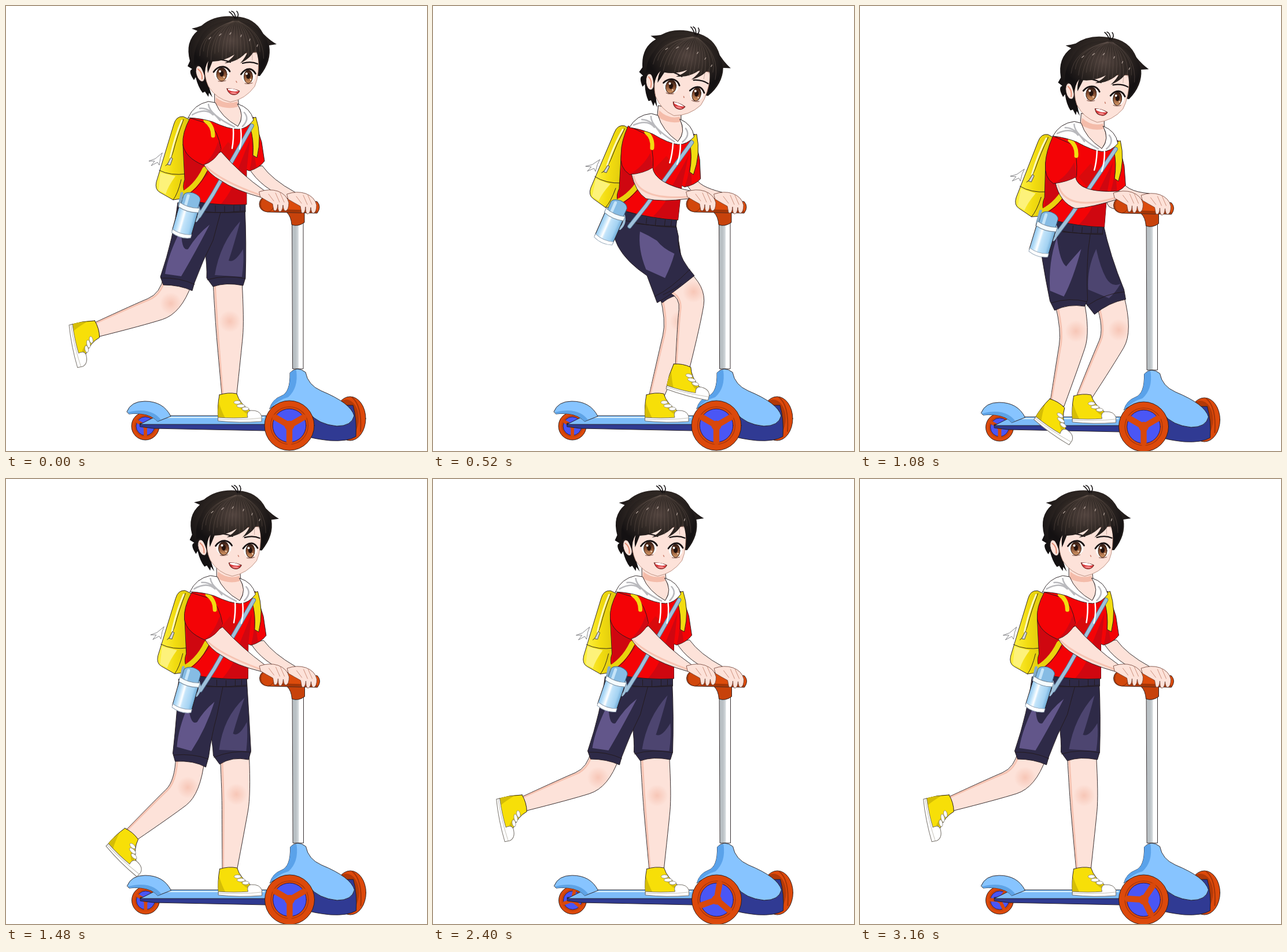
Recreate the animation shown at these times as an HTML page. Size 728 by 769 pixels, loop 3200 ms.

```html
<!DOCTYPE html>
<html lang="en">
<head>
<meta charset="utf-8">
<title>Scooter ride</title>
<style>
html, body { margin: 0; width: 100%; height: 100%; overflow: hidden; background: #fff; }
svg { display: block; width: 728px; height: 769px; }
path, ellipse, circle { stroke-linejoin: round; stroke-linecap: round; }
.ink { stroke: #231a1c; stroke-width: .9; }
.line { fill: none; stroke: #231a1c; stroke-width: .9; }
.skin { fill: #fde2d9; }
.edge { fill: none; stroke: #efa58c; stroke-width: 3; opacity: .5; }
</style>
</head>
<body>
<svg viewBox="0 0 728 769">
<defs>
  <radialGradient id="hairTone" cx=".5" cy=".35" r=".55">
    <stop offset="0" stop-color="#51433e"/><stop offset=".55" stop-color="#302824"/><stop offset="1" stop-color="#141112"/>
  </radialGradient>
  <radialGradient id="blush"><stop offset="0" stop-color="#f0a48c" stop-opacity=".45"/><stop offset="1" stop-color="#f0a48c" stop-opacity="0"/></radialGradient>
  <linearGradient id="iris" x2="0" y2="1"><stop offset="0" stop-color="#2a1711"/><stop offset=".45" stop-color="#7c472c"/><stop offset="1" stop-color="#d79a68"/></linearGradient>
  <linearGradient id="bag" x2="1"><stop offset=".1" stop-color="#fdee3c"/><stop offset=".4" stop-color="#f2dc10"/><stop offset="1" stop-color="#cdb90b"/></linearGradient>
  <linearGradient id="steel"><stop offset=".3" stop-color="#b9c0c4"/><stop offset=".55" stop-color="#d5dadd"/><stop offset=".6" stop-color="#fff"/></linearGradient>
  <linearGradient id="glass"><stop offset="0" stop-color="#8fc6ee"/><stop offset=".2" stop-color="#c6e6fb"/><stop offset=".35" stop-color="#fff"/><stop offset=".45" stop-color="#c3e4fa"/><stop offset=".8" stop-color="#a3d2f2"/><stop offset="1" stop-color="#6eaad6"/></linearGradient>
  <g id="shoe">
    <path class="ink" fill="#f7df08" d="M-16-1Q-1-6 14-3Q19 14 38 27L42 39L-18 41Q-20 20-16-1Z"/>
    <path fill="#d5bd05" d="M-17 12Q-12 28-6 39L-18 40Q-20 26-17 12ZM16 6Q14 20 30 31L40 32Q24 20 16 6Z"/>
    <path d="M-18 38Q10 40 33 38Q30 28 38 26Q54 25 57 36V45Q18 48-18 44Z" fill="#fff" stroke="#77726b"/>
    <path d="M-17 41Q20 43 56 39" fill="none" stroke="#c5c2ba"/>
    <g fill="#fff" stroke="#8b867c" stroke-width=".8"><ellipse cx="15" cy="12" rx="6" ry="3"/><ellipse cx="21" cy="18" rx="7" ry="3"/><ellipse cx="29" cy="23" rx="6" ry="3"/></g>
  </g>
  <path id="hand" class="skin" stroke="#6b3c30" stroke-width=".8" d="M438 321Q455 315 470 320Q486 326 489 340Q489 352 484 354Q480 355 479 344Q478 357 472 355Q470 352 470 343Q469 357 463 353L461 342Q450 336 440 330Z"/>
</defs>
<g id="world">
  <g id="scooter">
    <ellipse cx="595" cy="713" rx="27" ry="38" fill="#dd490b" class="ink"/>
    <ellipse cx="588" cy="713" rx="22" ry="33" fill="#b23908"/>
    <path d="M598 676Q616 690 613 735" fill="none" stroke="#a23408" stroke-width="2"/>
    <g id="rearWheel"></g>
    <path class="ink" fill="#2f3a91" d="M232 721H450V734L255 730L232 727Z"/>
    <path class="ink" fill="#7dbcf8" d="M262 708H450V723H232Z"/>
    <path d="M272 711H446" stroke="#d9efff" stroke-width="2"/>
    <path class="ink" fill="#87c4ff" d="M209 701Q216 683 240 683Q272 683 285 709L262 718Q247 701 213 705Z"/>
    <path fill="#5ea3e6" d="M211 702Q250 692 268 715L262 718Q247 701 213 705Z"/>
    <path class="ink" fill="#303a93" d="M460 690L600 690Q607 715 605 744Q590 753 560 751Q530 748 515 742Z"/>
    <path class="ink" fill="#87c4ff" d="M456 696Q460 680 476 674Q492 668 491 634Q503 621 518 633Q522 655 545 665Q596 686 602 708Q598 726 572 726Q540 723 524 703Q510 685 490 684Q470 685 456 696Z"/>
    <path fill="#5aa2ea" d="M456 696Q460 680 476 674Q492 668 491 634Q498 628 502 630Q506 660 488 676Q472 680 456 696Z"/>
    <path class="ink" fill="url(#steel)" d="M495 374H514V627H496Z"/>
    <g id="frontWheel"></g>
  </g>
  <path id="farArm" class="skin ink"/>
  <g id="farLeg"></g>
  <use href="#shoe" x="385" y="673"/>
  <path id="farShorts" class="ink" fill="#2e2a47"/>
  <path id="farShine" fill="#4d4570"/>
  <g id="nearLeg"></g>
  <use href="#shoe" id="nearShoe"/>
  <path id="nearShorts" class="ink" fill="#2e2a47"/>
  <path id="nearShine" fill="#62568a"/>
  <path id="nearHem" class="line"/>
  <path id="farHem" class="line"/>
  <g id="torso">
    <path class="ink" fill="#2e2a47" d="M300 338L414 340V356Q360 360 298 350Z"/>
    <path class="line" d="M345 357Q380 358 414 354M362 345V355M378 346V356M394 345V355M405 345V354"/>
    <path class="ink" fill="url(#bag)" d="M306 191Q294 190 290 205L260 304Q257 317 266 322L289 335L303 333L335 300L325 200Z"/>
    <path fill="#fdf27a" d="M267 288L293 294Q280 312 276 325L264 318Z"/>
    <path class="line" d="M265 284Q285 294 312 290M307 196Q296 225 289 252Q283 272 276 276M289 335Q297 325 303 300"/>
    <path d="M304 198Q292 225 284 262" fill="none" stroke="#fff9c0" stroke-width="3"/>
    <path d="M285 262L279 274L284 275L288 264Z" fill="#d8d8d8" stroke="#555"/>
    <path d="M270 254L258 264L247 268L257 268L251 276L262 270L265 275L267 263Z" fill="#fff" stroke="#68686c" stroke-width=".8"/>
    <path class="ink" fill="#f40306" d="M320 190L400 204L428 192L442 235L447 268Q438 280 421 285L416 283V343Q368 345 327 338Q300 325 309 300L306 240Z"/>
    <path fill="#cf0710" d="M309 245Q324 270 340 272L350 290Q330 312 310 320ZM400 285Q395 315 372 342L416 342V285L422 230Q410 260 400 285ZM425 225Q428 260 421 284L433 280Z"/>
    <path fill="#d90a0c" d="M384 235L400 250L380 275L365 260Z"/>
    <path d="M300 328Q328 315 344 282" fill="none" stroke="#e9d30d" stroke-width="9"/>
    <path d="M304 333Q332 319 348 286" class="line"/>
    <path class="ink" fill="#f2dc10" d="M424 195L432 192Q443 225 434 262L427 258Q429 230 422 210Z"/>
    <path d="M425 207L358 325L334 363" fill="none" stroke="#557b9b" stroke-width="7.5"/>
    <path d="M425 207L358 325L334 363" fill="none" stroke="#9fc1da" stroke-width="5.5"/>
    <path d="M304 324L300 344" stroke="#84abc8" stroke-width="5"/>
  </g>
  <g id="bottleHang"><g id="bottle"><g transform="translate(323 326) rotate(16)">
    <path d="M15 18Q24 30 18 42" fill="none" stroke="#9fc1da" stroke-width="4"/>
    <path class="ink" fill="url(#glass)" d="M-17 26H17V70Q0 76-17 70Z"/>
    <path d="M-17 67Q0 73 17 67V73Q0 80-17 73Z" fill="#fff" stroke="#9ab"/>
    <path d="M-15 23V5Q-13-2 0-3Q13-2 15 5V23Z" fill="#86bce4" stroke="#3f6787"/>
    <path d="M-7 20V4" stroke="#c5e4f8" stroke-width="5"/>
    <path d="M-18 19Q0 25 18 19V27Q0 33-18 27Z" fill="#f4fbff" stroke="#789"/>
  </g></g></g>
  <path id="arm" class="skin ink"/>
  <path id="armEdge" class="edge"/>
  <path id="sleeve" class="ink" fill="#f40306"/>
  <path id="fold" fill="#d00812"/>
  <g id="chest">
    <path d="M345 198Q358 207 358 224" fill="none" stroke="#f2dc10" stroke-width="7"/>
    <path class="skin ink" d="M361 150L401 155Q402 180 410 188L401 210Q372 196 361 174Z"/>
    <path fill="#f3b39f" d="M363 158Q380 172 400 165L401 174Q382 180 362 170Z" opacity=".8"/>
    <path class="ink" fill="#fff" d="M315 193Q325 170 350 165L362 167Q372 192 401 208Q414 190 400 169Q423 176 428 197Q417 212 402 213Q385 213 357 200Q338 194 315 193Z"/>
    <path d="M322 188Q345 175 358 188M335 177Q352 175 370 198M412 184Q422 195 409 208M350 170Q352 188 395 209" fill="none" stroke="#b9b9bd" stroke-width="2.5"/>
    <path d="M393 211Q394 230 391 246M406 212Q408 230 404 247" fill="none" stroke="#fff" stroke-width="2.5"/>
  </g>
  <g id="head">
    <path fill="url(#hairTone)" d="M321 39Q331 37 338 34Q360 15 396 18Q430 19 445 48Q457 60 468 66L455 68Q460 95 439 121L345 115Q350 140 357 158L351 150L350 157L344 148L340 150Q332 140 328 123L325 128Q314 112 322 109L314 104L318 95Q309 62 331 43Z"/>
    <path d="M396 22Q390 12 386 10M397 21Q396 10 390 9M399 22Q404 14 399 9" fill="none" stroke="#171314" stroke-width="1.6"/>
    <ellipse class="skin ink" cx="336" cy="117" rx="7" ry="14" transform="rotate(-17 336 117)"/>
    <path d="M332 109Q340 115 339 126" fill="none" stroke="#e58e74" stroke-width="2"/>
    <path class="skin" stroke="#a4705f" stroke-width=".7" d="M342 88Q342 123 350 139Q364 161 388 166Q414 161 430 139Q439 119 436 80Z"/>
    <g id="eyes"></g>
    <path d="M358 93Q372 91 388 97M409 99Q424 95 435 100" fill="none" stroke="#171314" stroke-width="2.2"/>
    <path d="M398 130L399 132" stroke="#c77967" stroke-width="1.5"/>
    <path d="M382 143Q393 142 404 147Q400 155 391 153Q384 151 382 143Z" fill="#d73a3c" stroke="#5d211e"/>
    <path d="M384 143Q394 142 402 147Q392 149 384 145Z" fill="#fff"/>
    <path d="M387 150Q394 147 400 151Q394 154 387 150Z" fill="#f58b8c"/>
    <path fill="url(#hairTone)" d="M333 62Q345 25 395 25Q445 30 454 68Q455 98 438 118Q439 95 431 72Q427 88 405 99Q415 88 419 76Q404 96 378 99Q390 92 395 84Q376 96 357 96L349 116Q347 104 350 95Q343 104 344 124Q336 95 326 104Q322 82 333 62Z"/>
    <g id="strands" fill="none" stroke="#75645b" stroke-width=".8" opacity=".5"></g>
    <path d="M351 57L354 54M369 51L372 48M387 49L389 46M406 53L407 50M421 60L422 57M434 70L435 67" stroke="#a99a92" stroke-width="1.4"/>
  </g>
  <g id="bar">
    <path class="ink" fill="#c7420b" d="M486 347H516V374Q505 382 494 378Q493 364 486 357Z"/>
    <path class="ink" fill="#dc4b0c" d="M452 329L538 338Q546 347 538 358L452 356Q438 354 438 342Q439 330 452 329Z"/>
    <ellipse cx="452" cy="342.500" rx="12" ry="13" fill="#d2470c" stroke="#7d2b08"/>
    <path d="M464 353L536 355" stroke="#a33507" stroke-width="4"/>
    <use href="#hand" x="48" y="4"/>
    <use href="#hand"/>
    <path d="M454 325L463 337M466 323L473 339M474 323L481 339M502 329L511 341M514 327L521 343M522 327L529 343" fill="none" stroke="#c88874" stroke-width=".9"/>
  </g>
</g>
</svg>
<script>
const LOOP = 3200, STEP = 40, GLIDE = 1750;
const times = [0, 540, 1080, 1480, GLIDE];
const $ = id => document.getElementById(id);
const NUM = /-?\d+(\.\d+)?/g;

// Each entry holds four poses; the ride closes on the first unless a fifth is given.
const poses = [
  ['world', 'transform', 'translate(0 0)', 'translate(0 0)', 'translate(0.5 2)', 'translate(0.5 2)', 'translate(0.5 2)'],
  ['head', 'transform', 'translate(0 0) rotate(0 396 120)', 'translate(39 27) rotate(12 396 120)', 'translate(26 34) rotate(5.5 396 120)', 'translate(3 0) rotate(0.5 396 120)'],
  ['torso', 'transform', 'translate(0 0) rotate(0 363 345)', 'translate(8 22) rotate(6.5 363 345)', 'translate(6 33) rotate(4.5 363 345)', 'translate(2 0) rotate(0.3 363 345)'],
  ['bottleHang', 'transform', 'translate(0 0) rotate(0 325 330)', 'translate(0 14) rotate(8 325 330)', 'translate(6 31) rotate(1 325 330)', 'translate(0 1) rotate(0 325 330)'],
  ['farArm', 'd', 'M420 280L443 276Q460 300 500 322L492 335Q440 315 420 280Z', 'M437 300L456 298Q458 312 500 322L492 336Q440 330 437 300Z', 'M432 300L452 296Q455 318 500 322L492 334Q428 363 426 335Z', 'M422 281L445 277Q462 300 500 322L492 335Q442 315 422 281Z'],
  ['arm', 'd', 'M372 252Q405 290 448 320L442 331Q395 318 372 302Q350 290 341 272Z', 'M380 280Q382 308 448 320L442 333Q395 340 368 334Q350 322 343 290Z', 'M372 293Q376 322 448 318L448 331Q400 346 372 348Q345 338 337 302Z', 'M374 254Q407 290 448 320L442 331Q397 320 374 304Q352 292 343 274Z'],
  ['armEdge', 'd', 'M346 277Q370 302 440 327', 'M347 295Q355 337 440 330', 'M342 307Q355 354 440 330', 'M348 279Q372 302 440 327'],
  ['sleeve', 'd', 'M318 194Q304 220 306 240Q310 262 341 275Q362 268 372 247Q366 215 352 204Z', 'M338 208Q326 235 326 255Q322 280 340 292Q365 290 381 280Q382 245 372 224Z', 'M333 223Q321 250 320 270Q318 295 334 305Q358 302 374 293Q376 255 368 238Z', 'M320 195Q306 221 308 241Q312 263 343 276Q364 269 374 248Q368 216 354 205Z'],
  ['fold', 'd', 'M341 274Q358 262 367 234L372 247Q362 268 341 274Z', 'M340 291Q362 280 376 255L381 280Q365 290 340 291Z', 'M334 304Q356 295 370 268L374 293Q358 302 334 304Z', 'M343 275Q360 263 369 235L374 248Q364 269 343 275Z'],
  ['nearShorts', 'd', 'M297 340Q290 400 267 468L272 482Q300 482 322 492L326 478Q340 440 358 405L375 342Z', 'M313 362Q300 420 374 466L392 514Q410 504 457 465L446 452Q424 425 427 398L418 364Z', 'M306 370Q312 430 328 508L336 524Q360 512 388 517L393 506Q391 460 394 420L400 375Z', 'M298 344Q296 400 288 472L292 486Q324 484 345 496L350 478Q355 440 364 408L377 345Z'],
  ['farShorts', 'd', 'M330 345L413 345Q416 410 414 470L410 483Q380 477 358 485L347 470Q349 430 330 345Z', 'M340 368L418 366Q428 420 438 488L432 500Q414 500 398 514L385 500Q370 440 340 368Z', 'M340 376L420 374Q432 430 456 488L459 505Q430 510 405 531L390 512Q382 450 340 376Z', 'M330 348L416 348Q420 410 423 468L419 483Q390 477 369 491L358 476Q356 430 330 348Z'],
  ['nearShine', 'd', 'M303 385Q280 430 275 463L303 467Q325 430 352 378Q330 395 315 420Q303 425 303 385Z', 'M360 390Q357 420 372 455L405 470Q415 450 420 430Q400 420 390 405Q375 395 360 390Z', 'M340 398Q325 440 328 490L352 500Q368 470 382 418Q362 440 356 448Q345 440 340 398Z', 'M315 388Q297 430 295 461L320 468Q345 430 360 383Q340 400 330 418Q318 425 315 388Z'],
  ['farShine', 'd', 'M405 372Q370 410 361 465L408 468Q412 440 410 420Q395 445 385 440Q395 410 405 372Z', 'M415 400Q410 430 405 470L420 480Q428 470 428 460Q422 455 420 440Q418 420 415 400Z', 'M408 418Q392 450 394 488L430 503Q440 495 450 478Q435 485 425 468Q415 450 408 418Z', 'M412 376Q375 410 368 466L415 468Q418 440 416 418Q402 445 392 438Q400 410 412 376Z'],
  ['nearHem', 'd', 'M268 470Q300 469 326 481', 'M388 503Q415 490 449 454', 'M330 511Q362 501 392 509', 'M289 475Q325 472 349 482'],
  ['farHem', 'd', 'M348 473Q380 464 414 471', 'M400 500Q420 490 430 480', 'M392 516Q425 494 456 492', 'M359 479Q390 466 423 470'],
];
// hip x y, knee x y, shin angle, shin length, shoe angle
const nearPose = ['297 474 285 514 160.5 137 78', '428 475 457 493 96 131 12', '362 510 373 560 104.5 131 35', '318 480 314 531 140 128 44'];
const farPose = ['383 476 387 545', '418 496 430 545', '432 506 447 558', '395 478 398 543'];

const mix = (a, b, k) => {
  const to = b.match(NUM);
  let i = 0;
  return a.replace(NUM, v => (+v + (to[i++] - v) * k).toFixed(2));
};
function poseAt(list, t) {
  const at = i => list[i] || list[0];
  let i = 0;
  while (i < 4 && t >= times[i + 1]) i++;
  return i == 4 ? at(4) : mix(at(i), at(i + 1), (t - times[i]) / (times[i + 1] - times[i]));
}
const unit = ([x, y]) => { const n = Math.hypot(x, y); return [x / n, y / n]; };
const sub = (a, b) => [a[0] - b[0], a[1] - b[1]];
const lerp = (a, b, k) => [a[0] + (b[0] - a[0]) * k, a[1] + (b[1] - a[1]) * k];
const str = p => p.map(v => v.toFixed(1)).join(' ');

function leg(hip, knee, ankle) {
  const thigh = unit(sub(knee, hip)), shin = unit(sub(ankle, knee));
  const bend = unit([thigh[0] + shin[0], thigh[1] + shin[1]]);
  const off = (p, d, w) => [p[0] - d[1] * w, p[1] + d[0] * w];
  const side = s => [off(hip, thigh, 25 * s), off(knee, bend, 25 * s), off(lerp(knee, ankle, .42), shin, 20 * s), off(ankle, shin, 12.5 * s)];
  const a = side(1), b = side(-1);
  const down = p => `${str(p[0])}Q${str(p[1])} ${str(lerp(p[1], p[2], .5))}Q${str(p[2])} ${str(p[3])}`;
  const up = `L${str(b[3])}Q${str(b[2])} ${str(lerp(b[1], b[2], .5))}Q${str(b[1])} ${str(b[0])}Z`;
  return `<path class="skin ink" d="M${down(a)}${up}"/>
    <path class="edge" d="M${down(a.map((p, i) => lerp(p, b[i], .06)))}"/>
    <circle cx="${knee[0]}" cy="${knee[1]}" r="19" fill="url(#blush)"/>`;
}

function wheel(id, x, y, r) {
  const spokes = [90, 210, 330].map(a => `<path d="M0 0H${r * .66}" transform="rotate(${a})"/>`).join('');
  $(id).innerHTML = `<g transform="translate(${x} ${y})">
    <circle r="${r}" fill="#dc490b" class="ink"/>
    <circle r="${r * .77}" fill="#a93608"/><circle r="${r * .74}" fill="#d9480b"/>
    <circle r="${r * .67}" fill="#4a56f5" stroke="#251d58"/>
    <g class="spin" stroke="#d9480b" stroke-width="${r * .24}">${spokes}</g>
    <circle r="${r * .2}" fill="#d9480b"/></g>`;
}
wheel('rearWheel', 241, 726, 24);
wheel('frontWheel', 490, 725, 43);

$('eyes').innerHTML = [[373, 118, 10], [419, 122, 8.5]].map(([x, y, w]) => `<g transform="translate(${x} ${y})">
  <ellipse rx="${w + 3}" ry="11" fill="#fff"/>
  <ellipse rx="${w - 1}" ry="11.5" fill="url(#iris)" stroke="#3a2118"/>
  <ellipse rx="3.5" ry="5" cy="-1" fill="#24130e"/>
  <circle cx="-3" cy="-5" r="2" fill="#fff"/><circle cx="4" cy="5" r="1.2" fill="#ffe9d2"/>
  <path d="M${-w - 4}-4Q${-w + 3}-14 3-13Q${w}-12 ${w + 4}-5" fill="none" stroke="#181213" stroke-width="2.8"/>
  <path d="M-6 12Q0 14 7 11" fill="none" stroke="#7d5042"/></g>`).join('');

let strands = '';
for (let i = 0; i < 18; i++) {
  const x = 335 + i * 6.5, y = 86 - 8 * Math.sin(i * 1.7);
  strands += `M${392 + i * .6} 26Q${x} ${38 + Math.abs(i - 8)} ${x} ${y}`;
}
$('strands').innerHTML = `<path d="${strands}"/>`;

const spins = document.querySelectorAll('.spin');
function draw(t) {
  for (const [id, attr, ...list] of poses) $(id).setAttribute(attr, poseAt(list, t));
  $('chest').setAttribute('transform', $('torso').getAttribute('transform'));

  const [hx, hy, kx, ky, angle, len, tilt] = poseAt(nearPose, t).split(' ').map(Number);
  const rad = angle * Math.PI / 180;
  const ankle = [kx + len * Math.cos(rad), ky + len * Math.sin(rad)];
  $('nearLeg').innerHTML = leg([hx, hy], [kx, ky], ankle);
  $('nearShoe').setAttribute('transform', `translate(${ankle}) rotate(${tilt})`);

  const far = poseAt(farPose, t).split(' ').map(Number);
  $('farLeg').innerHTML = leg(far.slice(0, 2), far.slice(2), [386, 675]);

  // Once the kick ends the wheels roll and the bottle sways.
  const glide = Math.max(0, t - GLIDE);
  const swing = -3 * Math.sin(glide / 900 * 2 * Math.PI);
  $('bottle').setAttribute('transform', `rotate(${swing} 325 330)`);
  spins.forEach(s => s.setAttribute('transform', `rotate(${glide / (LOOP - GLIDE) * 960})`));
}

let start;
function tick(now) {
  start ??= now;
  draw(Math.floor((now - start) % LOOP / STEP) * STEP);
  requestAnimationFrame(tick);
}
draw(0);
requestAnimationFrame(tick);
</script>
</body>
</html>
```
